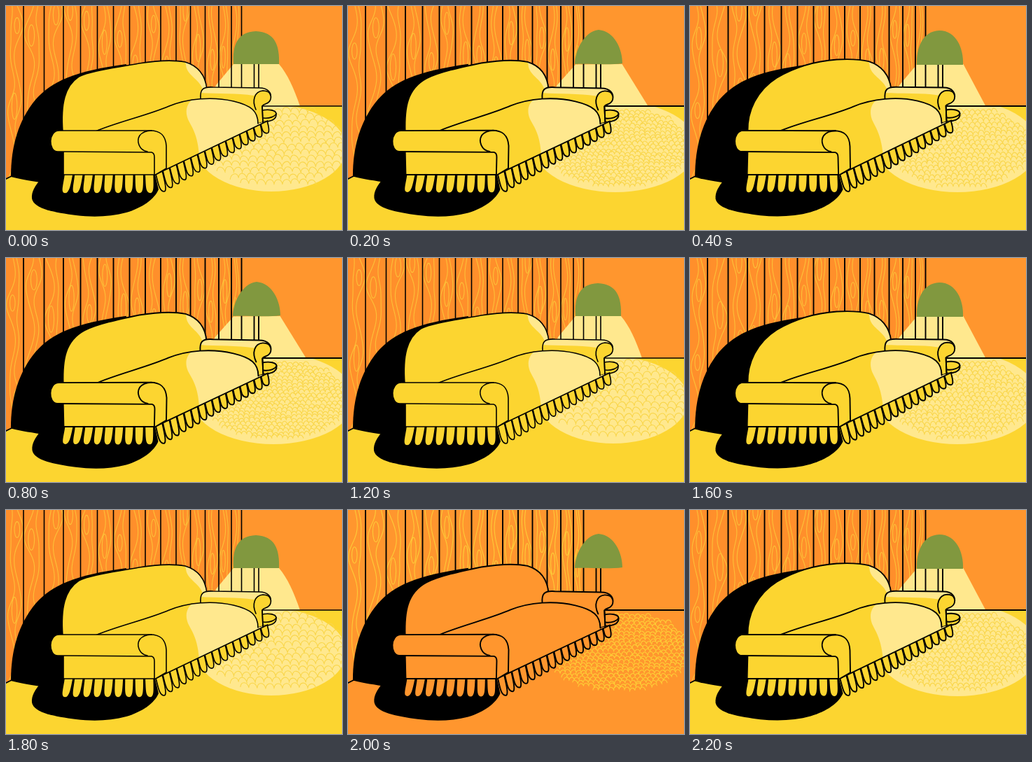
Recreate the animation shown at these times as an HTML page with a canvas. Size 480 by 320 pixels, loop 2.4 s.

```html
<!DOCTYPE html>
<html>
<head>
<meta charset="utf-8">
<style>
html, body { margin: 0; width: 100%; height: 100%; overflow: hidden; background: #fcd530; }
canvas { display: block; width: 480px; height: 320px; }
</style>
</head>
<body>
<canvas id="stage" width="480" height="320"></canvas>
<script>
const ctx = document.getElementById('stage').getContext('2d');
const ORANGE = '#ff962e', YELLOW = '#fcd530', PALE = '#ffe88e', GREEN = '#81983f';

// Three redrawn poses make the line art boil.
const POSES = [
  { line: 1.6, warp: 0, seed: 11, scale: [12, 8.5], tabEnd: 268, pool: [379, 203, 107, 62],
    shade: 'M325,83 C323,57 330,37 357,36 C384,37 391,56 390,83 Z',
    cone: 'M325,83 L390,83 C402,97 411,117 420,143 L290,143 L300,113 Z',
    back: 'M81,180 C78,140 84,114 104,101 C122,92 160,88 190,82 C215,78 240,77 256,80' },
  { line: 1.9, warp: .4, seed: 47, scale: [8, 6.2], tabEnd: 267, pool: [382, 200, 116, 66],
    shade: 'M324,84 C323,60 332,36 356,35 C380,35 391,60 390,84 Z',
    cone: 'M325,83 L390,83 L423,143 L285,143 L299,113 Z',
    back: 'M82,180 C82,150 96,121 124,103 C142,92 172,79 210,76 C230,75 244,76 256,79' },
  { line: 1.9, warp: -.4, seed: 83, scale: [7.5, 5], tabEnd: 267, pool: [382, 201, 117, 65],
    shade: 'M324,83 C324,65 337,36 358,34 C381,36 392,62 392,82 C372,85 345,82 324,83 Z',
    cone: 'M325,83 L392,83 L428,143 L285,143 L299,113 Z',
    back: 'M82,180 C80,145 84,118 112,103 C130,94 160,88 190,82 C215,78 240,77 256,80' }
];
const ORDER = [0, 2, 1], DARK_STEPS = [7, 10];
const PANELS = [0, 25, 54.5, 82, 106.5, 130.5, 153.5, 176.5, 199, 221, 243, 263.5, 284.5, 304, 322, 336.5];

const BACK_END = ' C276,86 285,100 287,119 L280,140 L130,180 Z';
const SEAT_TOP = 'M128,179 C158,166 203,156 233,143 C260,132 295,129 325,136 C350,142 360,150 360,168';
const SEAT = SEAT_TOP + ' L374,164 L213,241 L82,241 L82,178 Z';
const RIGHT_ARM = 'M278,133 C277,120 280,115 296,116 L362,117 C374,117 380,124 378,133 C376,141 368,139 366,143 L367,166 L360,168 L340,145 Z';
const LEFT_ARM = 'M76,178 C60,178 60,208 74,208 L208,209 Q212,210 212,216 L212,242 L229,232 L229,200 C228,184 220,178 206,178 Z';
const SHADOW = 'M7,244 C7,200 18,163 42,134 C66,107 98,93 172,83 L150,180 L100,252 L50,252 C30,249 18,247 7,244 Z';
const FLOOR_SHADOW = 'M48,249 C42,257 36,265 37,275 C40,290 70,295 100,299 C125,302 150,301 172,295 C195,288 212,276 218,262 L213,241 L82,241 Z';

let pose, dark;

function random(seed) {
  return () => {
    seed = (seed * 16807) % 2147483647;
    return seed / 2147483647;
  };
}

function warp(x, y) {
  const a = pose.warp;
  return [x + 1.3 * a * Math.sin(y * .055 + x * .018 + 2),
          y + 1.3 * a * Math.sin(x * .026 - y * .01 - 3)];
}

const shape = d => new Path2D(d.replace(/(-?[\d.]+),(-?[\d.]+)/g, (m, x, y) => warp(+x, +y).join()));

function fill(path, color) {
  ctx.fillStyle = color;
  ctx.fill(path);
}

function stroke(path, color = '#000', width = pose.line) {
  ctx.strokeStyle = color;
  ctx.lineWidth = width;
  ctx.stroke(path);
}

function inside(path, draw) {
  ctx.save();
  ctx.clip(path);
  draw();
  ctx.restore();
}

function ellipse(x, y, rx, ry) {
  const p = new Path2D();
  p.ellipse(x, y, rx, ry, 0, 0, 7);
  return p;
}

function grain() {
  const rnd = random(pose.seed), p = new Path2D();
  for (let i = 1; i < PANELS.length; i++) {
    const left = PANELS[i - 1], w = PANELS[i] - left, mid = left + w / 2;
    const phase = rnd() * 6, gap = 95 + rnd() * 45, knot = rnd() * 90;
    const sway = y => mid + w * .14 * Math.sin(y / 15 + phase);
    for (const side of [-1, 1]) {
      for (let y = -4; y < 250; y += 4) {
        const d = ((y - knot + gap * 4.5) % gap) - gap / 2;
        const x = sway(y) + side * w * (.1 + .24 * Math.exp(-d * d / 500));
        y < 0 ? p.moveTo(x, y) : p.lineTo(x, y);
      }
    }
    for (let y = knot; y < 250; y += gap) {
      const h = 11 + rnd() * 9;
      p.moveTo(sway(y) + w * .15, y);
      p.ellipse(sway(y), y, w * .15, h, 0, 0, 7);
    }
  }
  stroke(p, dark ? '#fdcb38' : '#fcc038', 1.1);
}

function rug() {
  const rnd = random(pose.seed + 5), [w, h] = pose.scale, p = new Path2D();
  for (let y = 152, row = 0; y < 260; y += h, row++) {
    const half = 101 * Math.sqrt(Math.max(0, 1 - ((y - 203) / 58) ** 2));
    for (let x = 383 - half + (row % 2) * w / 2; x < 383 + half; x += w) {
      const j = (rnd() - .5) * 4, k = (rnd() - .5) * 3;
      p.moveTo(x, y + j);
      p.bezierCurveTo(x + w * .1, y - h + j, x + w * .8, y - h + k, x + w, y + k);
    }
  }
  stroke(p, dark ? '#fdcd36' : '#f9d64a', 1.1);
}

function tab(x, y, dx, dy, w, rise, color) {
  const p = shape(`M${x},${y} C${x + dx * .4},${y + dy * .5} ${x + dx - 3},${y + dy} ${x + dx + w * .4},${y + dy} ` +
    `C${x + dx + w * .9},${y + dy} ${x + w * .9 + dx * .5},${y + dy * .55 + rise} ${x + w * .96},${y + rise}`);
  fill(p, color);
  stroke(p);
}

function fringe(color) {
  for (let i = 0; i < 16; i++) {
    const s = 1 - i / 15;
    tab(214 + i * 10, 240 - i * 4.75, 5 + 3 * s, 13 + 12 * s, 9.5, -4.5, color);
  }
  for (let i = 0; i < 9; i++) tab(83 + i * 14.4, 241, (i - 5) * .8, pose.tabEnd - 241, 13.5, 0, color);
}

function room(base) {
  const leftWall = new Path2D('M0,0 H337 V143 L150,200 L8,243 L0,247 Z');
  fill(new Path2D('M0,0 H480 V320 H0 Z'), base);
  fill(new Path2D('M337,0 H480 V143 H337 Z'), ORANGE);
  fill(leftWall, dark ? ORANGE : '#ff8f2b');
  inside(leftWall, grain);
  if (!dark) {
    fill(shape(pose.cone), PALE);
    inside(new Path2D('M0,143 H480 V320 H0 Z'), () => fill(ellipse(...pose.pool), PALE));
  }
  inside(leftWall, () => {
    for (const x of PANELS.slice(1, -1)) stroke(new Path2D(`M${x},-3 V250`));
  });
  stroke(new Path2D('M336.5,-3 V143 H484 M-2,248 L10,242'));
  rug();
}

function lamp(base) {
  const foot = shape('M366,149 C376,147 386,149 386,154 C387,163 376,166 364,165 Z');
  fill(foot, base);
  stroke(foot);
  stroke(shape('M368,160 C376,161 384,158 386,154'));
  stroke(new Path2D('M354.5,80 V118 M361,80 V118'));
  fill(new Path2D(pose.shade), GREEN);
}

function sofa(base) {
  const back = shape(pose.back + BACK_END), arm = shape(RIGHT_ARM), seat = shape(SEAT), front = shape(LEFT_ARM);
  fill(back, base);
  if (!dark) inside(back, () => fill(shape('M255,76 L300,76 L300,122 L281,119 C276,104 258,99 257,84 Z'), PALE));
  stroke(back);
  fill(arm, base);
  if (!dark) inside(arm, () => fill(shape('M276,124 L278,114 L376,115 L372,121 C362,121 358,124 354,128 C330,124 300,126 276,124 Z'), PALE));
  stroke(arm);
  fringe(base);
  fill(seat, base);
  if (!dark) inside(seat, () => fill(shape('M272,130 C258,137 255,149 260,162 C266,174 274,184 276,214 L380,172 L368,130 Z'), PALE));
  stroke(shape(SEAT_TOP));
  stroke(shape('M374,164 L213,241 L82,241 L82,207'));
  stroke(shape('M357,148 C351,135 355,122 367,121 C373,121 377,123 378,128 M366,143 L367,167'));
  fill(front, base);
  stroke(front);
  stroke(shape('M202,208 C190,206 186,193 191,185 C195,180 201,178 208,178'));
}

function draw(step) {
  pose = POSES[ORDER[step % 3]];
  dark = DARK_STEPS.includes(step);
  const base = dark ? ORANGE : YELLOW;
  room(base);
  fill(shape(SHADOW), '#000');
  fill(shape(FLOOR_SHADOW), '#000');
  lamp(base);
  sofa(base);
}

ctx.lineJoin = ctx.lineCap = 'round';
let shown = -1;
function tick() {
  const step = Math.floor(performance.now() / 200) % 12;
  if (step !== shown) draw(shown = step);
  requestAnimationFrame(tick);
}
tick();
</script>
</body>
</html>
```
